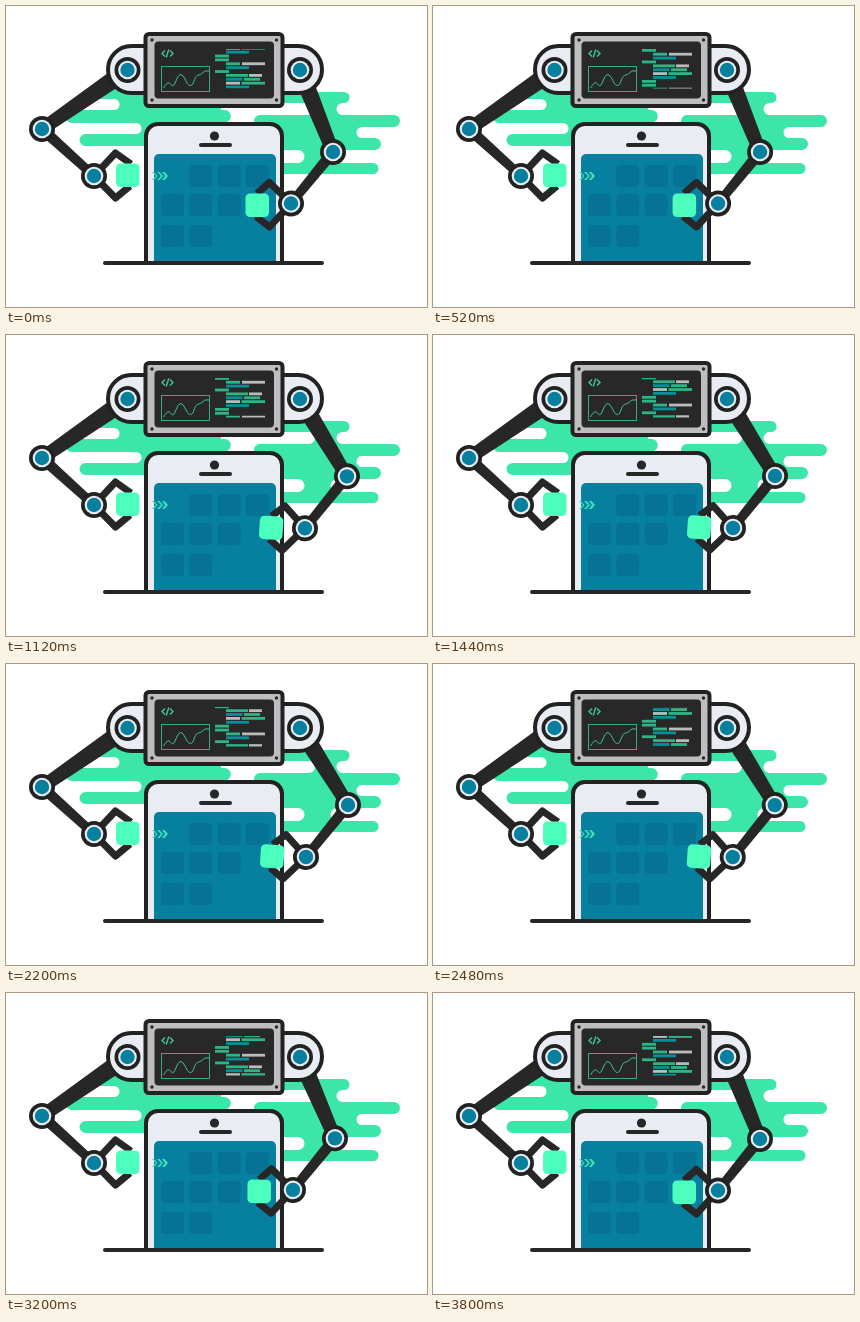
Recreate the animation shown at these times as an HTML page. Size 421x301 px, loop 3.84 s.

```html
<!DOCTYPE html>
<html lang="en">
<head>
<meta charset="utf-8">
<title>Robot arms building an app</title>
<style>
  html, body { margin: 0; width: 100%; height: 100%; overflow: hidden; background: #fff; }
  svg { display: block; width: 421px; height: 301px; }
  .ink { fill: #272727; }
  .line { fill: none; stroke: #272727; stroke-width: 4; stroke-linecap: round; stroke-linejoin: round; }
  .shell { fill: #e9ecf3; stroke: #222; stroke-width: 4; }
  .claw { fill: none; stroke: #272727; stroke-width: 7; stroke-linejoin: round; }
  .cube { fill: #4dffbc; }
  .neon { fill: none; stroke: #3fc997; }
</style>
</head>
<body>
<svg viewBox="0 0 421 301">
  <defs>
    <g id="joint">
      <circle r="13" fill="#222"/>
      <circle r="9.3" fill="#e9ecf3"/>
      <circle r="7.2" fill="#0780a0"/>
    </g>
    <clipPath id="window"><rect x="209" y="43" width="51" height="39.5"/></clipPath>
  </defs>

  <g fill="#3ce5a8">
    <path d="M85 82H215V104H218.500A6 6 0 0 1 218.500 116.500H150V140H79.500A6 6 0 0 1 79.500 128H130A5.500 5.500 0 0 0 130 117H66A6.500 6.500 0 0 1 66 104H108A5.500 5.500 0 0 0 108 93H85Z"/>
    <path d="M270 86H338A5.500 5.500 0 0 1 338 97H336.500A6 6 0 0 0 336.500 109H388A6 6 0 0 1 388 121H356A5.500 5.500 0 0 0 356 132H369A6 6 0 0 1 369 144H331A6.500 6.500 0 0 0 331 157H367A5.500 5.500 0 0 1 367 168H270V157H292A6.500 6.500 0 0 0 292 144H270V121H254A6 6 0 0 1 254 109H303A6 6 0 0 0 303 97H270Z"/>
  </g>

  <path class="shell" d="M140 257V130A12 12 0 0 1 152 118H264A12 12 0 0 1 276 130V257"/>
  <path d="M148 256V153A5 5 0 0 1 153 148H265A5 5 0 0 1 270 153V256Z" fill="#0780a0"/>
  <g id="tiles" fill="#067294"></g>
  <path d="M146 166l4 4-4 4h2l3.500-4-3.500-4zm5 0l4 4-4 4h2.500l3.500-4-3.500-4zm5 0l3 4-3 4h2.500l3.500-4-3.500-4z" fill="#3fe0b4"/>
  <circle class="ink" cx="208.500" cy="130" r="4.600"/>
  <path class="line" d="M195 139H224"/>
  <path class="line" d="M99 257H316"/>

  <path class="ink" id="leftArm"/>
  <g transform="translate(88 170)">
    <path class="claw" d="M37 -12L21.500 -23 0 0 21.500 22 36 10"/>
    <rect class="cube" x="22" y="-12.500" width="23.500" height="23.500" rx="4.500"/>
    <use href="#joint"/>
  </g>
  <use href="#joint" x="36" y="123"/>

  <path class="ink" id="rightArm"/>
  <g id="hand">
    <path class="claw" d="M-34 -10L-21.500 -21 0 0 -21.500 23.500 -35 13"/>
    <rect class="cube" x="-45.500" y="-10" width="23.500" height="23.500" rx="4.500"/>
    <use href="#joint"/>
  </g>
  <use href="#joint" id="elbow"/>

  <rect class="shell" x="102" y="40" width="214" height="47" rx="23.500"/>
  <use href="#joint" x="121.500" y="64"/>
  <use href="#joint" x="294" y="64"/>

  <rect x="139.500" y="28" width="137" height="72" rx="3.500" fill="#bebec0" stroke="#222" stroke-width="4"/>
  <rect x="148.500" y="35.500" width="119.500" height="57" rx="4" fill="#282828"/>
  <g class="ink">
    <circle cx="146" cy="34" r="1.700"/><circle cx="270.500" cy="34" r="1.700"/>
    <circle cx="146" cy="94" r="1.700"/><circle cx="270.500" cy="94" r="1.700"/>
  </g>
  <path class="neon" stroke-width="1.400" d="M159 44.500L156 47.500 159 50.500M164 44.500L167 47.500 164 50.500M162.800 43.500L160.200 51.500"/>
  <rect class="neon" x="155.500" y="60.500" width="48" height="25" stroke-opacity=".8"/>
  <path class="neon" d="M157.500 82C160 78 162 75.500 164 77.500S167 82 169.500 76 174 66.500 177 70 181 79.500 184.500 79.500 188 71 191.500 69.500 195 68.500 197 66.500 200 65 203 65"/>
  <g clip-path="url(#window)"><g id="code"></g></g>
</svg>

<script>
const LOOP = 3840, STEP = 40;
const PITCH = 3.88, PERIOD = PITCH * 9;
const GREEN = '#2fb585', GRAY = '#b9bcbb', TEAL = '#07909a';
const $ = id => document.getElementById(id);

function rect(parent, x, y, w, h, attrs) {
  const el = document.createElementNS('http://www.w3.org/2000/svg', 'rect');
  for (const [k, v] of Object.entries({ x, y, width: w, height: h, ...attrs })) el.setAttribute(k, v);
  parent.append(el);
}

// App tiles: first column and number of tiles per row
[[159, 1, 3], [188, 0, 3], [219, 0, 2]].forEach(([y, first, count]) => {
  for (let i = 0; i < count; i++) rect($('tiles'), 155 + 28.3 * (first + i), y, 23, 22, { rx: 4 });
});

// Code lines: bars as [x, width, colour]
const head = [[209, 14, GREEN]], plain = [[220, 23, TEAL]];
const lines = [
  head, head,
  [[220, 14, GREEN], [236, 23, GRAY]],
  plain, head,
  [[220, 22, GREEN], [243, 13, GRAY]],
  [[220, 16.5, TEAL], [238, 16, GREEN]],
  [[220, 14, GRAY], [235.5, 23.500, GREEN]],
  plain
];
for (let i = -9; i < 18; i++) {
  for (const [x, w, fill] of lines[(i + 9) % 9]) {
    rect($('code'), x, 48.6 + i * PITCH, w, 2.8, { fill });
  }
}

// Sums eased moves given as [start, end, amount]
function track(t, moves) {
  return moves.reduce((sum, [a, b, amount]) => {
    const p = Math.min(1, Math.max(0, (t - a) / (b - a)));
    return sum + amount * (1 - Math.cos(Math.PI * p)) / 2;
  }, 0);
}

const scrollMoves = [
  [-240, 390, 14], [1050, 1450, 13.1], [2160, 2700, 7.82], [3600, 4230, 14]
];
const armMoves = [[480, 1250, 1], [2394, 3450, -1]];

// A bar between two points, w1 wide at the first and w2 at the second
function bar([x1, y1], [x2, y2], w1, w2) {
  const len = Math.hypot(x2 - x1, y2 - y1);
  const nx = (y1 - y2) / len / 2, ny = (x2 - x1) / len / 2;
  return `M${x1 + nx * w1} ${y1 + ny * w1}L${x2 + nx * w2} ${y2 + ny * w2}` +
    `L${x2 - nx * w2} ${y2 - ny * w2}L${x1 - nx * w1} ${y1 - ny * w1}Z`;
}
const limb = (shoulder, elbow, wrist) => bar(shoulder, elbow, 18, 13) + bar(elbow, wrist, 11, 9);
const place = (id, [x, y], turn = 0) =>
  $(id).setAttribute('transform', `translate(${x} ${y}) rotate(${turn})`);

$('leftArm').setAttribute('d', limb([121.5, 64], [36, 123], [88, 170]));

function draw(t) {
  const out = track(t, armMoves);
  const elbow = [327 + 15 * out, 146 - 5 * out];
  const wrist = [285 + 15 * out, 197.5 - 4.5 * out];
  $('rightArm').setAttribute('d', limb([294, 64], elbow, wrist));
  place('elbow', elbow);
  place('hand', wrist, 4 * out);
  const scroll = track(t, scrollMoves) - track(0, scrollMoves);
  place('code', [0, -(scroll % PERIOD)]);
}

const start = performance.now();
function tick() {
  const t = (performance.now() - start) % LOOP;
  draw(Math.floor(t / STEP) * STEP);
  requestAnimationFrame(tick);
}
tick();
</script>
</body>
</html>
```
